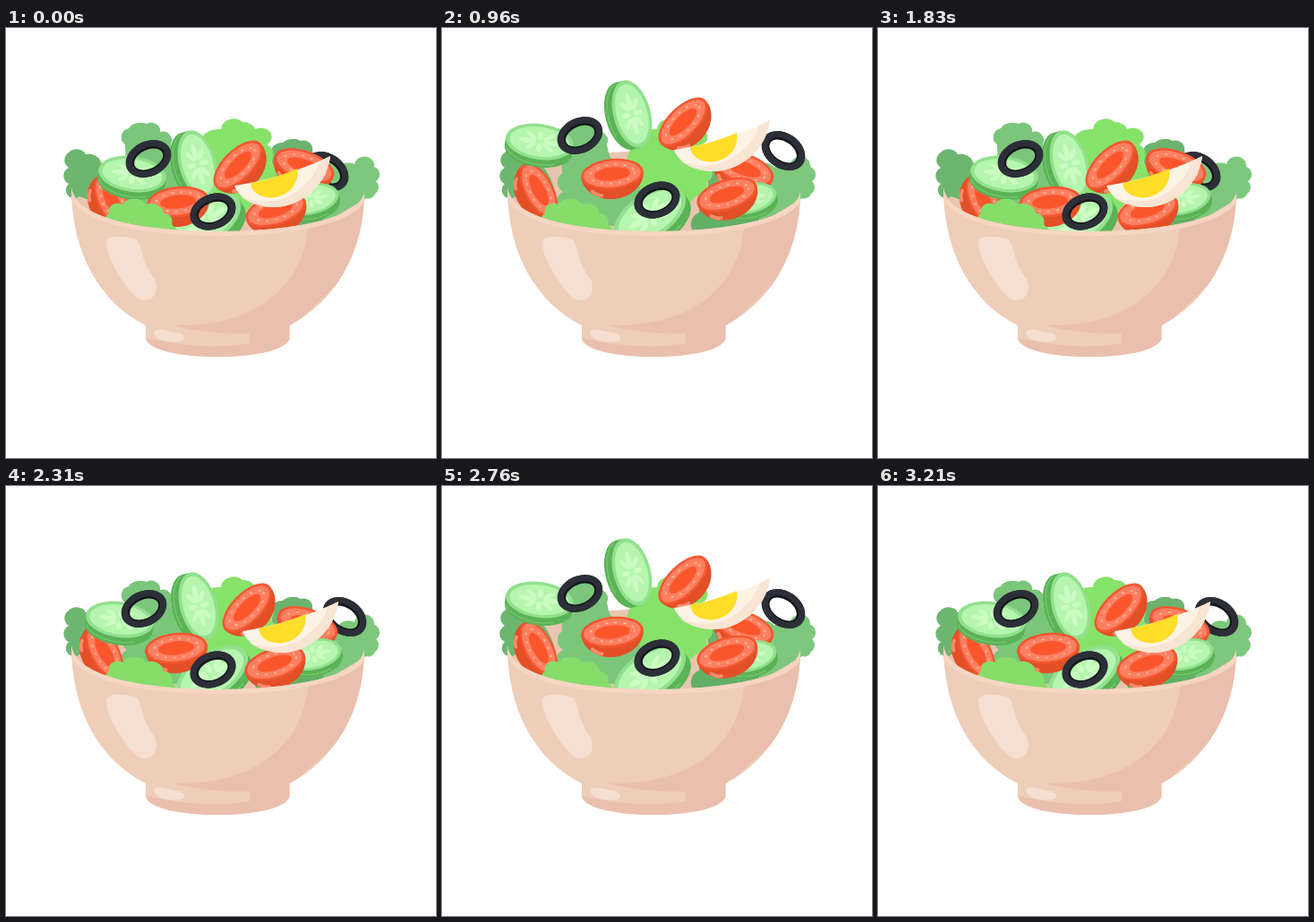
Recreate the animation shown at these times as an HTML page. Size 480 by 480 pixels, loop 3600 ms.

```html
<!DOCTYPE html>
<html lang="en">
<head>
<meta charset="utf-8">
<title>Salad bowl</title>
<style>
  html, body { margin: 0; width: 100%; height: 100%; overflow: hidden; background: #fff; }
  svg { display: block; width: 100%; height: 100%; }

  /* --a: resting, --b: lifted, --c: tossed */
  .piece { translate: var(--a); animation: toss 3600ms step-end infinite; }
  @keyframes toss {
    0%, 50.8333% { translate: var(--a); }
    13.3333%, 38.3333%, 63.3333%, 88.3333% { translate: var(--b); }
    25.8333%, 75.8333% { translate: var(--c); }
    100% { translate: var(--a); }
  }
</style>
</head>
<body>
<svg viewBox="0 0 480 480">
  <defs>
    <g id="seeds">
      <ellipse cx="14" rx="10" ry="3"/>
      <ellipse cx="-14" rx="10" ry="3"/>
      <ellipse cy="7" rx="3" ry="5"/>
      <ellipse cy="-7" rx="3" ry="5"/>
      <ellipse cx="10" cy="6" rx="7" ry="2.600" transform="rotate(32 10 6)"/>
      <ellipse cx="-10" cy="-6" rx="7" ry="2.600" transform="rotate(32 -10 -6)"/>
      <ellipse cx="-10" cy="6" rx="7" ry="2.600" transform="rotate(-32 -10 6)"/>
      <ellipse cx="10" cy="-6" rx="7" ry="2.600" transform="rotate(-32 10 -6)"/>
    </g>

    <g id="cucumber">
      <path fill="#5ab355" d="M-39 0v9a39 21 0 0 0 78 0v-9z"/>
      <path fill="none" stroke="#74c56d" stroke-width="1.5" d="M-37 11A39 21 0 0 0 20 24"/>
      <ellipse rx="39" ry="21" fill="#92e08e"/>
      <ellipse rx="34.5" ry="17.5" fill="#b5f5ae"/>
      <use href="#seeds" fill="#cbfdc2"/>
    </g>

    <g id="tomato">
      <path fill="#e34f27" d="M-35 0A35 28 0 0 0 35 0z"/>
      <path fill="none" stroke="#ff8a6c" stroke-width="4" stroke-linecap="round" d="M-24 17q4 5 10 6"/>
      <ellipse rx="35" ry="17" fill="#f4572f"/>
      <ellipse rx="32" ry="14.5" fill="#ff7f62"/>
      <ellipse rx="25" ry="10.5" fill="none" stroke="#ffb486" stroke-width="2" stroke-dasharray="3 7"/>
      <ellipse rx="20" ry="7.5" fill="#fb552c"/>
    </g>

    <g id="olive" fill-rule="evenodd">
      <path fill="#14161b" d="M-26 0a26 19.500 0 0 1 52 0a26 19.500 0 0 1-52 0zM-17 .5a17 10.500 0 0 0 34 0a17 10.500 0 0 0-34 0z"/>
      <path fill="#2c2f37" d="M-26.500 0a26.500 19.500 0 0 1 53 0a26.500 19.500 0 0 1-53 0zM-19 0a19 12.500 0 0 0 38 0a19 12.500 0 0 0-38 0z"/>
    </g>

    <g id="egg">
      <path fill="#fdf3e5" d="M255 176Q312 167 362 143C357 182 322 201 297 200C275 199 259 188 255 176z"/>
      <path fill="#f8e5d3" d="M362 143C357 182 322 201 297 200C281 199 269 194 262 188C282 197 304 195 322 184C337 174 346 162 350 149z"/>
      <path fill="#ffdd28" d="M273 173C274 185 287 191 301 189C318 186 328 171 325 157Q300 168 273 173z"/>
    </g>

    <path id="bowl" d="M73 178C78 215 160 227 237 227C310 227 395 215 400 183C400 250 367 306 316.500 332V347C312 360 276 367 236 367C196 367 160 360 156 347V332C105 306 73 252 73 178z"/>
    <clipPath id="inBowl"><use href="#bowl"/></clipPath>
  </defs>

  <!-- back of the bowl and lettuce -->
  <ellipse cx="237" cy="183" rx="162" ry="46" fill="#e8c5b0"/>
  <path fill="#6db670" d="M82 188a9 9 0 0 1-12-14a10 10 0 0 1 0-18a10 10 0 0 1 0-17a11 9 0 0 1 19 2a14 12 0 0 1 17 9Q125 160 130 205z"/>
  <path fill="#7bc67a" d="M135 200L133 130a10 10 0 0 1 4-18a14 10 0 0 1 20-5a10 9 0 0 1 15 9a10 10 0 0 1 12 14q4 30 50 80z"/>
  <path fill="#6cb36e" d="M297 200L297 142a12 10 0 0 1 12-14a14 10 0 0 1 20-2a10 9 0 0 1 13 10q6 30 0 70z"/>
  <path fill="#7dc87c" d="M320 225Q330 170 345 162a14 12 0 0 1 26-6a12 9 0 0 1 18-4a10 9 0 0 1 22 3a9 9 0 0 1 2 16a9 9 0 0 1-1 14a8 8 0 0 1-10 5L360 215z"/>
  <path fill="#87e269" d="M200 225Q196 150 218 122a24 20 0 0 1 22-9a14 12 0 0 1 24-8a14 11 0 0 1 14 8a12 10 0 0 1 13 17a12 12 0 0 1 4 20a12 12 0 0 1 0 22a12 12 0 0 1-12 16q-20 20-30 40z"/>
  <path fill="#7ac779" d="M120 218L134 205a12 12 0 0 1 2-22a12 12 0 0 1 10-22a16 14 0 0 1 26-12a14 14 0 0 1 24 4q26 8 40 70z"/>
  <path fill="#62b065" d="M283 230a14 14 0 0 1 4-24a20 16 0 0 1 32-14a24 18 0 0 1 40 6L350 225z"/>

  <!-- tossed pieces -->
  <use href="#olive" class="piece" style="rotate:35deg;--a:358px 160px;--b:378px 146px;--c:381px 137px"/>
  <use href="#tomato" class="piece" style="rotate:20deg;--a:333px 154px;--b:337px 154px;--c:337px 157px"/>
  <use href="#cucumber" class="piece" style="rotate:-12deg;scale:.82;--a:340px 191px;--b:343px 188px;--c:342px 190px"/>
  <use href="#tomato" class="piece" style="rotate:62deg;scale:.95;--a:119px 194px;--b:110px 185px;--c:108px 181px"/>
  <use href="#cucumber" class="piece" style="rotate:8deg;scale:.98 .95;--a:141px 163px;--b:127px 149px;--c:109px 127px"/>
  <use href="#cucumber" class="piece" style="rotate:75deg;scale:.99;--a:214px 152px;--b:215px 134px;--c:212px 96px"/>
  <use href="#cucumber" class="piece" style="rotate:-33deg;scale:1.16;--a:222px 216px;--b:230px 210px;--c:232px 209px"/>
  <use href="#tomato" class="piece" style="rotate:-6deg;--a:192px 194px;--b:190px 181px;--c:190px 163px"/>
  <use href="#tomato" class="piece" style="rotate:-45deg;--a:259px 153px;--b:269px 136px;--c:269px 105px"/>
  <use href="#tomato" class="piece" style="rotate:-18deg;--a:301px 203px;--b:300px 198px;--c:318px 186px"/>
  <use href="#egg" class="piece" style="--a:0px 0px;--b:9px -14px;--c:4px -40px"/>
  <use href="#olive" class="piece" style="rotate:-25deg;--a:159px 146px;--b:154px 137px;--c:154px 120px"/>
  <use href="#olive" class="piece" style="rotate:-22deg;--a:231px 205px;--b:231px 205px;--c:240px 192px"/>

  <path fill="#86dd6a" d="M114 222a9 9 0 0 1 1-15a10 9 0 0 1 15-10a14 10 0 0 1 26 0a14 12 0 0 1 20 10a9 9 0 0 1 9 12l12 12z"/>

  <!-- bowl front -->
  <use href="#bowl" fill="#eecdb9"/>
  <g clip-path="url(#inBowl)">
    <path fill="#ebbfad" d="M338 215C334 290 278 334 187 332Q225 342 272 341V352Q220 361 156 346V370H320V332L410 250V170z"/>
    <path fill="none" stroke="#f6d5c2" stroke-width="10" d="M73 178C78 215 160 227 237 227C310 227 395 215 400 183"/>
  </g>
  <path fill="#f4dfd2" d="M112 238C114 231 132 232 145 236C153 240 150 262 166 280C170 290 168 300 160 303C148 308 140 296 132 285C120 268 111 250 112 238z"/>
  <path fill="#f4dfd2" d="M165 340Q167 335 175 337L195 341Q201 344 198 349Q190 352 176 349Q166 346 165 340z"/>
</svg>
</body>
</html>
```
